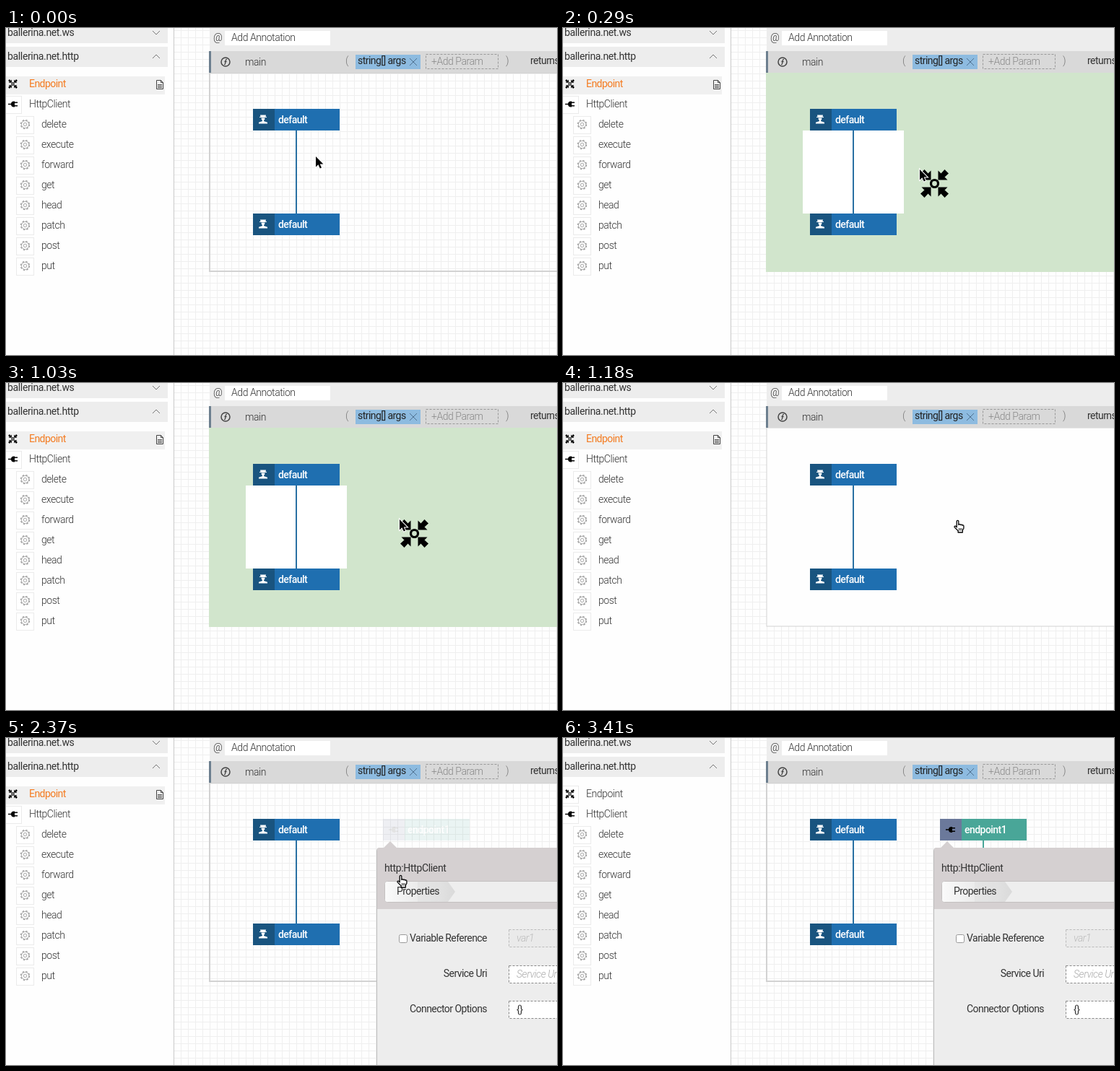
Recreate the animation shown at these times as an HTML page. Size 763 px wide and 453 px high, loop 4160 ms.

```html
<!DOCTYPE html>
<html lang="en">
<head>
<meta charset="utf-8">
<title>Adding an endpoint</title>
<style>
html, body { margin: 0; width: 100%; height: 100%; overflow: hidden; background: #fff; }
svg { display: block; width: 763px; height: 453px; }
text { font: 300 14px Roboto, Arial, sans-serif; letter-spacing: -.45px; fill: #333; white-space: pre; }
.reg { font-weight: 400; letter-spacing: -.55px; }
.head { font-weight: 400; letter-spacing: -.35px; }
.white { font-weight: 500; letter-spacing: -.55px; fill: #fff; }
.hint { fill: #888; }
.it { font-style: italic; fill: #aaa; }
.end { text-anchor: end; }
.line { fill: none; stroke: #777; }
.box { fill: #fff; stroke: #ebebeb; }
.dash { fill: #fff; stroke: #888; stroke-dasharray: 3 2; }
.hot { font-weight: 400; letter-spacing: -.55px; fill: #f47b20; }
</style>
</head>
<body>
<svg viewBox="0 0 763 453">
  <defs>
    <pattern id="grid" x="232" y="3" width="10" height="10" patternUnits="userSpaceOnUse">
      <path d="M.5 0V10M0 .5H10" stroke="#efefef" fill="none"/>
    </pattern>
    <linearGradient id="tab">
      <stop offset="0" stop-color="#fafafa"/><stop offset=".45" stop-color="#ececec"/>
      <stop offset="1" stop-color="#dadada"/>
    </linearGradient>
    <path id="inward" d="M-5-5V-18L-9-14L-14-19.5L-19.5-14L-14-9L-18-5Z"/>
    <g id="converge">
      <use href="#inward"/><use href="#inward" transform="rotate(90)"/>
      <use href="#inward" transform="rotate(180)"/><use href="#inward" transform="rotate(270)"/>
      <circle r="5" fill="none" stroke="#000" stroke-width="3.2"/>
    </g>
    <path id="plug" d="M-7-.8H-3Q-2.5-4 1-4H2V4H1Q-2.5 4-3 .8H-7ZM2-3H6V-1.4H2ZM2 1.4H6V3H2Z"/>
    <g id="gear" fill="none" stroke="#999">
      <circle r="6" stroke-width="1.3" stroke-dasharray="2.6 2.112"/>
      <circle r="5" stroke-width=".8"/><circle r="2.2" stroke-width=".9"/>
    </g>
    <g id="worker">
      <rect width="120" height="30" fill="#1f6fb0"/><rect width="30" height="30" fill="#19547f"/>
      <path d="M10 8.5H18L17.5 11H19V12H9V11H10.5ZM11.5 12.5H16.5Q16.500 15.500 15 16V17L20 18.800V20.500H8V18.800L13 17V16Q11.500 15.500 11.500 12.500Z" fill="#fff"/>
      <text class="white" x="35" y="20">default</text>
    </g>
  </defs>

  <rect width="763" height="453" fill="#fefefe"/>
  <rect x="233" width="530" height="453" fill="url(#grid)"/>
  <path d="M232.500 0V453" stroke="#c9c9c9"/>

  <!-- sidebar -->
  <path d="M0 0H224V21H0ZM0 26H224V54H0Z" fill="#ededed"/>
  <text class="head" x="2" y="11">ballerina.net.ws</text>
  <text class="head" x="2" y="44">ballerina.net.http</text>
  <path class="line" d="M203 4L208 9L213 4M203 42L208 37L213 42"/>
  <g id="hover">
    <rect y="67" width="220" height="25" fill="#f0f0f0"/>
    <path class="line" style="stroke:#444" d="M208.500 72.500H214.500L217.500 75.500V84.500H208.500ZM214.500 72.500V75.500H217.500M210 78.500H216M210 80.500H216M210 82.500H216"/>
  </g>
  <g id="items">
    <rect id="endBox" class="box" x="-1.500" y="66.500" width="23" height="24"/>
    <rect class="box" x="-1.500" y="94.500" width="23" height="24"/>
    <use href="#converge" transform="translate(9.500 77.500) scale(.33)"/>
    <use href="#plug" x="10" y="105.500"/>
    <text id="endName" x="32" y="82">Endpoint</text>
    <text x="32" y="110">HttpClient</text>
  </g>

  <!-- main function -->
  <rect id="body" x="282" y="62" width="490" height="275"/>
  <rect id="slot" x="332" y="142" width="140" height="115" fill="#fff"/>
  <rect x="282" width="481" height="32" fill="#ededed"/>
  <rect x="303" y="4" width="146" height="20" fill="#fff"/>
  <text x="287" y="18">@</text>
  <text x="312" y="18">Add Annotation</text>
  <rect x="282" y="32" width="481" height="30" fill="#d9d9d9"/>
  <rect x="281" y="32" width="3" height="30" fill="#6d7f8f"/>
  <circle cx="304" cy="47" r="6" fill="none" stroke="#444" stroke-width="1.500"/>
  <path d="M306 43.500Q304.500 43 304.200 45L303.600 49Q303.300 51 302 50.500M302.500 46.500H305.500" fill="none" stroke="#444" stroke-width="1.300"/>
  <text x="331" y="52">main</text>
  <text x="470" y="50" style="fill:#777">(</text>
  <rect x="484" y="37" width="90" height="20" fill="#8dbbe0"/>
  <text class="reg" x="487" y="50" style="fill:#222">string[] args</text>
  <path class="line" style="stroke:#4f7190" d="M559 42L569 52M569 42L559 52"/>
  <rect class="dash" style="fill:none;stroke:#999" x="581.500" y="36.500" width="100" height="20"/>
  <text class="hint" x="589" y="51">+Add Param</text>
  <text x="692" y="50" style="fill:#777">)</text>
  <text class="reg" x="726" y="50">returns</text>
  <path d="M402 142V257" stroke="#2a70a3" stroke-width="2"/>
  <use href="#worker" x="342" y="112"/>
  <use href="#worker" x="342" y="257"/>

  <!-- endpoint -->
  <g id="endpoint">
    <path id="wire" d="M582 142V153" stroke="#49a698" stroke-width="2"/>
    <rect x="522" y="112" width="120" height="30" fill="#49a698"/>
    <rect x="522" y="112" width="30" height="30" fill="#6b799b"/>
    <use href="#plug" x="537" y="127"/>
    <text class="white" x="556" y="132">endpoint1</text>
  </g>

  <!-- property form -->
  <g id="form">
    <path d="M513.500 460V156Q513.500 152.500 517 152.500H770V460Z" fill="#ededed" stroke="#bdbdbd"/>
    <path d="M514 237V156Q514 152 518 152H523L532 143L541 152H763V237Z" fill="#d5d0d1"/>
    <text class="head" x="524" y="185">http:HttpClient</text>
    <rect x="524.500" y="198.500" width="260" height="29" rx="4" fill="#eee" stroke="#c4c0c0"/>
    <path d="M525 202Q525 199 528 199H612L622 213L612 227H528Q525 227 525 224Z" fill="url(#tab)"/>
    <path d="M570 199H597L607 213L597 227H570Z" fill="#e2e2e2" opacity=".6"/>
    <text class="reg" x="541" y="217">Properties</text>
    <rect x="544.500" y="272.500" width="11" height="11" rx="2" fill="#fff" stroke="#999"/>
    <text class="reg end" x="666" y="282">Variable Reference</text>
    <text class="reg end" x="666" y="331">Service Uri</text>
    <text class="reg end" x="666" y="380">Connector Options</text>
    <rect class="dash" style="fill:#eaeaea;stroke:#bbb" x="696.500" y="265.500" width="90" height="24"/>
    <rect class="dash" x="696.500" y="315.500" width="90" height="24"/>
    <rect class="dash" x="696.500" y="364.500" width="90" height="24"/>
    <text class="it" style="fill:#bbb" x="707" y="282">var1</text>
    <text class="it" x="707" y="332">Service Uri</text>
    <text class="reg" x="707" y="381">{}</text>
  </g>

  <use id="drag" href="#converge"/>
  <path id="arrow" d="M0 0V14.500L3.400 11.300L5.800 16.600L8 15.600L5.700 10.400H10.400Z" stroke="#fff" stroke-width="2" paint-order="stroke"/>
  <g id="hand" transform="translate(540.700 189.500)" stroke="#000" stroke-width="1.300" stroke-linejoin="round">
    <path fill="#fff" d="M4.500 2.200c0-1.800 2.600-1.800 2.600 0V7c.2-1.200 2.400-1.200 2.500.2 .4-1 2.400-.9 2.400.5 .5-.8 2.200-.5 2.200.9v3.200l-1.600 3v2.700H6.400v-2.200L1.500 10.400c-.8-1.400 .9-2.300 2-1.200l1 1.200z"/>
    <path d="M7.800 11.500V15M9.700 11.500V15M11.500 11.500V15" stroke-width=".8"/>
  </g>
</svg>
<script>
const LOOP = 4160;
const $ = id => document.getElementById(id);
const show = (id, on) => $(id).style.display = on ? "" : "none";
const move = (id, x, y) => $(id).setAttribute("transform", `translate(${x} ${y})`);

$("items").innerHTML += ["delete", "execute", "forward", "get", "head", "patch", "post", "put"]
  .map((name, i) => {
    const y = 133 + 28 * i;
    return `<rect class="box" x="14.5" y="${y - 10.5}" width="24" height="24"/>
      <use href="#gear" x="26.5" y="${y + .5}"/><text x="49" y="${y + 5}">${name}</text>`;
  }).join("");

// start time, arrow x, y, dragged icon centre x, y
const steps = [
  [0, 429, 178],
  [140, 473, 190, 493.5, 208.5],
  [290, 494, 196, 514.5, 215.5],
  [440, 548, 194, 567.5, 213.5],
  [590, 559, 194, 580.5, 213.5],
  [740, 556, 194, 579.5, 213.5],
  [880, 545, 189, 566.5, 209.5],
  [1030, 545, 189, 565.5, 208.5],
  [1180],
  [2820, 544, 200],
  [2960, 620, 352],
  [3110, 659, 405],
  [3410]
];

function draw(t) {
  const [, x, y, dx, dy] = steps.findLast(s => s[0] <= t);
  const dropping = t >= 290 && t < 1180, blank = t >= 1180 && t < 1330;
  const hover = t < 2960, form = t >= 2370;

  show("arrow", x);
  if (x) move("arrow", x, y);
  show("drag", dx);
  if (dx) move("drag", dx, dy);
  show("hand", t >= 1180 && t < 2820);

  const body = $("body");
  body.setAttribute("fill", dropping ? "#d1e5cc" : blank ? "#fefefe" : "none");
  body.setAttribute("stroke", dropping ? "#d1e5cc" : "#d2d2d2");
  body.setAttribute("stroke-width", blank ? 1 : 2);
  show("slot", dropping);

  show("hover", hover);
  show("endBox", !hover);
  $("endName").classList.toggle("hot", hover);

  show("form", form);
  show("endpoint", form);
  show("wire", t >= 2520);
  $("endpoint").setAttribute("opacity", t < 2520 ? .1 : 1);
}

const start = performance.now();
function tick() {
  draw((performance.now() - start) % LOOP);
  requestAnimationFrame(tick);
}
tick();
</script>
</body>
</html>
```
